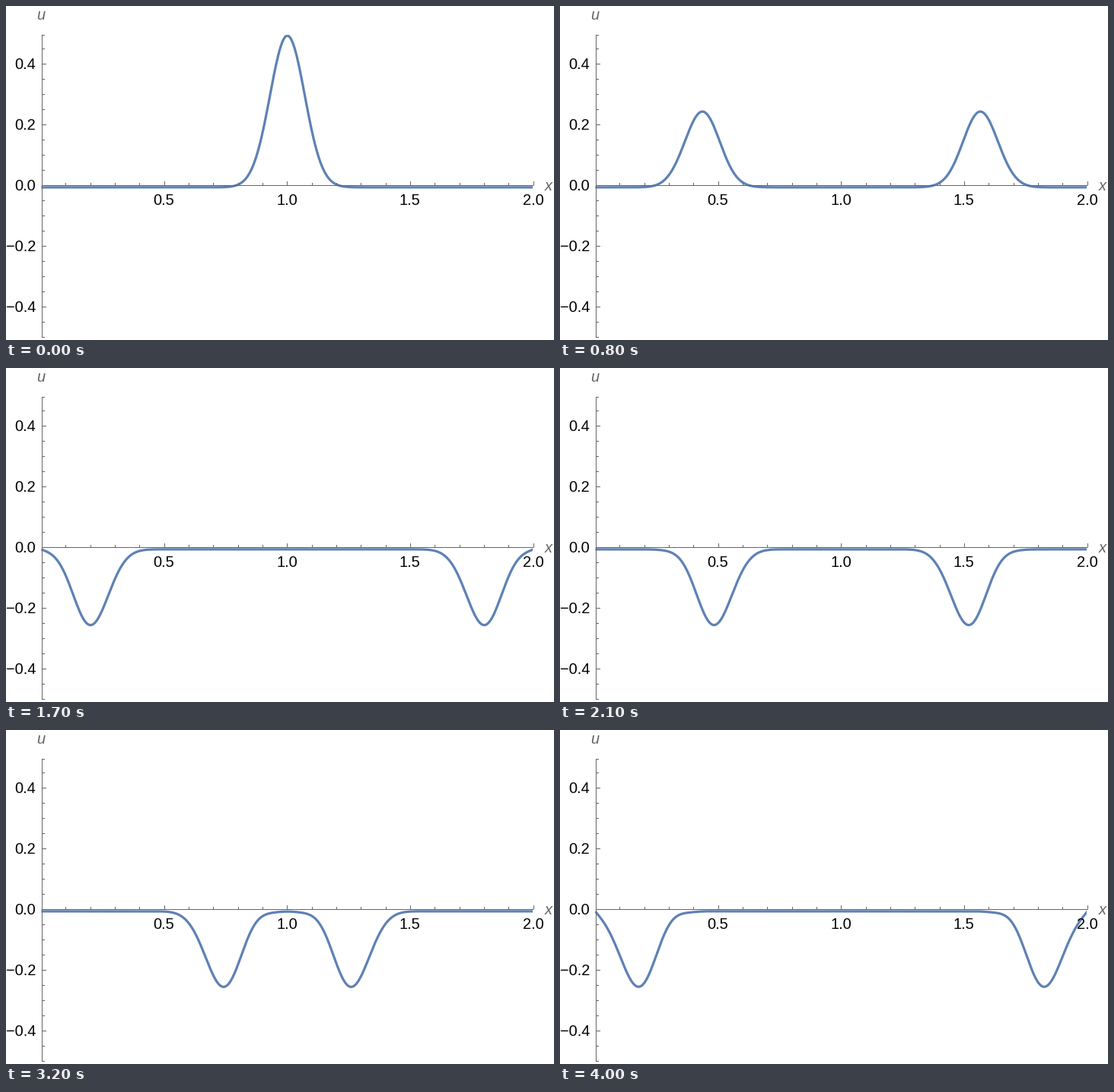
A matplotlib script for the animation above (4100 ms loop, 720 px wide and 440 px high).

```python
import numpy as np
import matplotlib.pyplot as plt
from matplotlib.animation import FuncAnimation
from matplotlib.patches import Rectangle

W, H, DPI = 720, 440, 100
PX = 72 / DPI                      # points per pixel
FRAMES, INTERVAL = 41, 100
X0, Y0 = 46.4, 236.5               # origin of the data in pixels
SX, SY = 323.3, 399.5              # pixels per unit
AXIS_X = 47.5                      # the vertical axis stands a pixel inside
SAG = 2.4                          # the curve rests just below the axis
GREY, BLUE = "#666666", "#5e81b5"

# Sine series of a plucked string fixed at x = 0 and x = 2,
# with slight numerical lag in the higher modes.
SPEED, LAG = 1 / np.sqrt(2), 2.9e-9
x = np.linspace(0, 2, 801)
k = np.arange(1, 46) * np.pi / 2
start = 0.5 * np.exp(-100 * (x - 1) ** 2)
modes = np.sin(np.outer(x, k))
weights = start @ modes * (x[1] - x[0])
omega = SPEED * k * (1 - LAG * k ** 4)


def wave(t):
    return modes @ (weights * np.cos(omega * t))


fig = plt.figure(figsize=(W / DPI, H / DPI), dpi=DPI, facecolor="white")
ax = fig.add_axes([0, 0, 1, 1])
ax.set_xlim(0, W)
ax.set_ylim(H, 0)
ax.axis("off")


def rule(xs, ys):
    ax.plot(xs, ys, color=GREY, lw=PX, solid_capstyle="butt",
            snap=False, zorder=3)


def label(px, py, text, ha="center", **style):
    ax.text(px, py, text, ha=ha, va="baseline", family="Liberation Sans",
            size=20 * PX, zorder=4, **style)


def mid(p):
    """Centre of the pixel that holds p."""
    return np.floor(p) + 0.5


rule([AXIS_X, AXIS_X], [38, 437])
rule([47, 693], [Y0, Y0])

for i in range(1, 21):
    px = X0 + i * 0.1 * SX
    major = i % 5 == 0
    rule([mid(px)] * 2, [Y0, Y0 - (5.5 if major else 3.5)])
    if major:
        label(px - 0.5, 262, f"{i / 10:.1f}")

for i in range(-10, 11):
    py = max(mid(Y0 - i * 0.05 * SY), 38.5)
    major = i % 4 == 0
    rule([AXIS_X, AXIS_X + (5.5 if major else 3.5)], [py, py])
    if major:
        label(39.5, py + 6.5, f"{i / 20:.1f}".replace("-", "\u2212"), ha="right")

label(45.5, 18, "u", color=GREY, style="italic")
label(713, 243, "x", color=GREY, style="italic")

curve, = ax.plot([], [], color=BLUE, lw=3.2 * PX, solid_capstyle="butt",
                 solid_joinstyle="round", zorder=2)
window = Rectangle((46, 38), 646, 399, transform=ax.transData)
curve.set_clip_path(window)


def draw(frame):
    curve.set_data(X0 + x * SX, Y0 + SAG - wave(frame * 0.1) * SY)
    return curve,


anim = FuncAnimation(fig, draw, frames=FRAMES, interval=INTERVAL,
                     repeat=True, repeat_delay=0)
plt.show()
```
